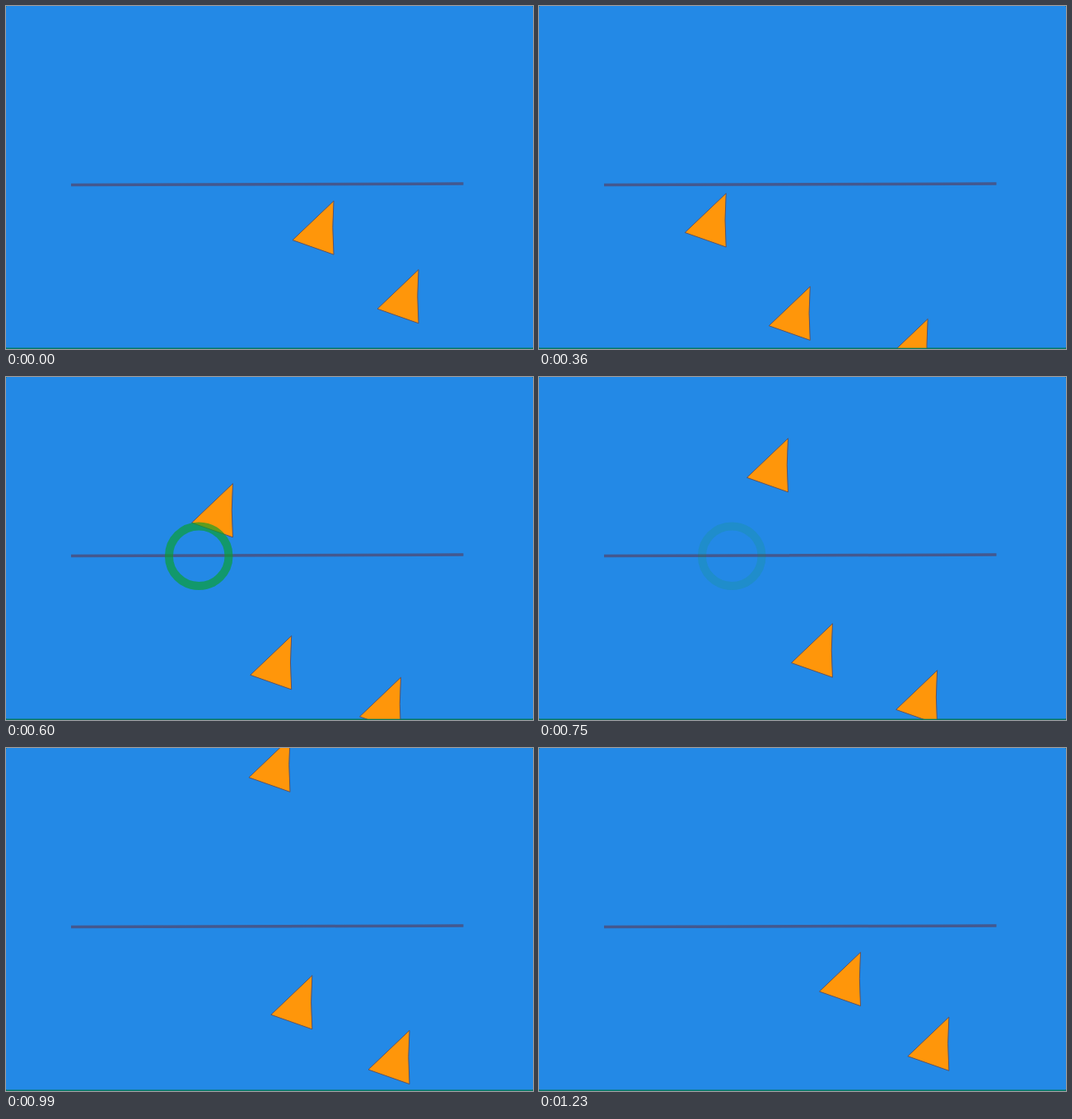
These frames come from a looping animation (640 px wide and 417 px high, 1260 ms). An HTML page:

```html
<!DOCTYPE html>
<html lang="en">
<head>
<meta charset="utf-8">
<title>Crossing the line</title>
<style>
  html, body { margin: 0; width: 100%; height: 100%; overflow: hidden; background: #08785f; }
  svg { display: block; width: 100vw; height: 100vh; }
</style>
</head>
<body>
<svg viewBox="0 0 640 417" preserveAspectRatio="none">
  <defs>
    <path id="kite" d="M0 0 L-50 47.7 L0 65.3 Q-2.4 32 0 0 Z"
          fill="#ff960a" stroke="#5d5363" stroke-width="1" stroke-linejoin="round"/>
  </defs>
  <rect width="640" height="417" fill="#08785f"/>
  <rect width="640" height="415.7" rx="1.5" fill="#2389e6"/>
  <path d="M79 217.6 L555.5 216.1" stroke="#43588f" stroke-width="3.5"/>
  <g id="kites"></g>
  <rect y="415.7" width="640" height="1.3" fill="#08785f"/>
  <circle id="ring" cx="234.2" cy="217.7" fill="none" stroke="#0aa128"/>
</svg>
<script>
const LOOP = 1260, STEP = 30, HOLD = 120;

// Tip position at progress 0 and its travel per unit of progress
const movers = [
  { x: 203, y: 277, dx: 48.4, dy: -98.5 },
  { x: 320.5, y: 354.3, dx: 17.5, dy: -26.5 },
  { x: 468.5, y: 388, dx: 7.34, dy: -15.24 }
];

// Slightly uneven clock: [time in ms, progress]
const clock = [
  [120, -0.5], [240, 0], [480, 1], [600, 1.497],
  [750, 2.055], [990, 2.933], [1170, 3.72], [1230, 4]
];
const REST = 4.43;

const ring = document.getElementById("ring");
const group = document.getElementById("kites");
const kites = movers.map(() => {
  const use = document.createElementNS("http://www.w3.org/2000/svg", "use");
  use.setAttribute("href", "#kite");
  return group.appendChild(use);
});

const clamp = v => Math.max(0, Math.min(1, v));

function progress(t) {
  if (t < HOLD) return REST;
  let i = 1;
  while (i < clock.length - 1 && t > clock[i][0]) i++;
  const [t0, p0] = clock[i - 1], [t1, p1] = clock[i];
  return p0 + (p1 - p0) * (t - t0) / (t1 - t0);
}

function draw(time) {
  const p = progress(Math.floor((time % LOOP) / STEP) * STEP);

  movers.forEach((m, i) => {
    kites[i].setAttribute("transform",
      `translate(${m.x + m.dx * p} ${m.y + m.dy * p})`);
  });

  // The ring pops open at the crossing, then fades
  const scale = clamp((p - 0.845) / 0.25);
  ring.setAttribute("r", 36.3 * scale);
  ring.setAttribute("stroke-width", 10 * scale);
  ring.setAttribute("opacity", scale > 0 ? clamp(1 - (p - 1.1) * 0.9) : 0);
}

let start;
function tick(now) {
  if (start === undefined) start = now;
  draw(now - start);
  requestAnimationFrame(tick);
}
draw(0);
requestAnimationFrame(tick);
</script>
</body>
</html>
```
